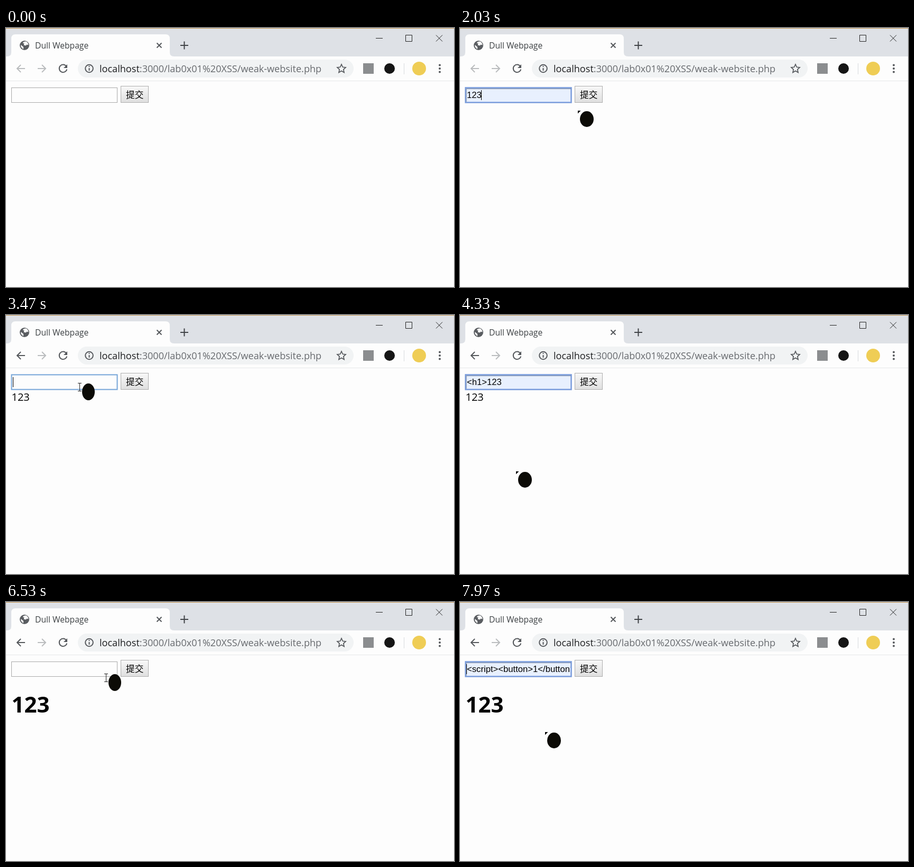
Animation, 848 px wide and 492 px high, one loop 8000 ms. Source, as an HTML page:

```html
<!DOCTYPE html>
<html lang="zh">
<head>
<meta charset="utf-8">
<title>Dull Webpage</title>
<style>
  html, body { margin: 0; width: 100%; height: 100%; overflow: hidden; background: #fdfdfd; }
  svg { display: block; }
  text { font-family: "Open Sans", "Noto Sans", sans-serif; white-space: pre; }
  .line { fill: none; stroke: #55585c; stroke-width: 2; }
  .thin { fill: none; stroke: #222; stroke-width: 1; }
  .field { font: 16.67px "Liberation Sans", Arial, sans-serif; }
  .cjk { font: 16.67px "Noto Sans CJK SC", "Noto Sans CJK", sans-serif; }
</style>
</head>
<body>
<svg width="848" height="492" viewBox="0 0 848 492">
  <defs>
    <linearGradient id="buttonFill" x2="0" y2="1">
      <stop stop-color="#f8f8f8"/><stop offset="1" stop-color="#dfdfdf"/>
    </linearGradient>
    <clipPath id="fieldClip"><rect x="12" y="114" width="197" height="26"/></clipPath>
  </defs>

  <!-- Tab strip -->
  <rect width="848" height="54" fill="#dee1e6"/>
  <rect width="848" height="1" fill="#c79852"/>
  <path d="M2 54q8 0 8-8V20q0-8 8-8H302q8 0 8 8V46q0 8 8 8Z" fill="#fdfdfd"/>
  <circle cx="35" cy="33" r="9" fill="#5a5d61"/>
  <path d="M28 32l5 4v4q-5-2-5-8ZM34 26l4-.5q4 2 4.500 7l-3-1-2 2-4-1 1-3-3-1Z" fill="#fdfdfd"/>
  <text x="55" y="39" font-size="15.670" fill="#3c4043">Dull Webpage</text>
  <path class="line" d="M285.500 28.500l9 9m0-9l-9 9"/>
  <path class="line" style="stroke:#404347" d="M330 33h15m-7.500-7.500v15"/>
  <path class="thin" d="M700 19.500h13M756.500 13.500h12v12h-12ZM814 13.500l12 12m0-12l-12 12"/>

  <!-- Toolbar -->
  <rect y="54" width="848" height="46" fill="#fdfdfd"/>
  <rect y="100" width="848" height="1" fill="#e6e7e9"/>
  <path id="back" class="line" d="M36 77H21m7-7l-7 7 7 7"/>
  <path class="line" style="stroke:#babcbe" d="M60 77h15m-7-7l7 7-7 7"/>
  <path class="line" d="M114 72.500a7.300 7.300 0 1 0 1.200 6"/>
  <path d="M116 69v7h-7Z" fill="#55585c"/>
  <rect x="136" y="60" width="522" height="34" rx="17" fill="#f1f3f4"/>
  <circle class="line" cx="157.500" cy="77" r="7.300"/>
  <path class="line" d="M157.500 76v5m0-9v2"/>
  <text x="177" y="83.500" font-size="18.100" fill="#676a6e"><tspan fill="#1c1d1f">localhost</tspan>:3000/lab0x01%20XSS/weak-website.php</text>
  <path class="line" style="stroke-width:1.700" d="M635 69l2.400 5.300 5.600.6-4.200 3.900 1.200 5.700-5-2.900-5 2.900 1.200-5.700-4.200-3.900 5.600-.6Z"/>
  <rect x="676" y="67" width="20" height="20" fill="#8b8d8f"/>
  <circle cx="726" cy="77" r="10" fill="#151515"/>
  <rect x="753" y="67" width="1" height="21" fill="#d8dade"/>
  <circle cx="782" cy="77" r="13" fill="#efcd55"/>
  <g fill="#55585c"><circle cx="821" cy="70.500" r="2"/><circle cx="821" cy="77" r="2"/><circle cx="821" cy="83.500" r="2"/></g>

  <!-- Page -->
  <rect id="box" x="10.500" y="113.500" width="200" height="28"/>
  <path id="inset" d="M12 140V115.500H210" fill="none" stroke="#74849c" stroke-width="1"/>
  <g clip-path="url(#fieldClip)"><text id="value" class="field" x="13" y="132.500"></text></g>
  <rect id="caret" y="118" width="1" height="19"/>
  <rect x="217.500" y="110.500" width="52" height="31" fill="url(#buttonFill)" stroke="#adadad"/>
  <text class="cjk" x="227" y="133">提交</text>
  <text id="plain" x="10.500" y="163" font-size="20">123</text>
  <text id="heading" x="10.500" y="210" font-size="42" font-weight="700">123</text>

  <g id="cursor">
    <path id="arrow" d="M0 0h5.500L0 5.500Z"/>
    <path id="beam" class="thin" d="M-3-7.500h7M-3 7.500h7M.5-7.500v15"/>
    <ellipse id="pet" cx="17" fill="#0c0b06"/>
  </g>
</svg>
<script>
const LOOP = 8000, BLINK = 1060;
const $ = id => document.getElementById(id);
const show = (id, visible) => $(id).setAttribute("visibility", visible ? "visible" : "hidden");
const setAttrs = (id, attrs) => {
  for (const name in attrs) $(id).setAttribute(name, attrs[name]);
};

// Each visit to the field: focus, value filled in, form sent.
const visits = [
  { focus: 900, fill: 1650, send: 2450, value: "123", caret: 40 },
  { focus: 3400, fill: 4150, send: 5800, value: "<h1>123", caret: 78 },
  { focus: 6900, fill: 7700, send: LOOP, value: "<script><button>1<\/button>", caret: 12 }
];

// Pointer stops: time, x, y
const stops = [
  [100, 300, 510], [800, 120, 130], [950, 120, 130], [1500, 110, 180],
  [1680, 110, 180], [2030, 223, 157], [2250, 230, 129], [2500, 230, 129],
  [3300, 139, 137], [3600, 139, 137], [4130, 106, 297], [4700, 106, 297],
  [5400, 227, 131], [5850, 227, 131], [6530, 189, 144], [6850, 140, 132],
  [7050, 140, 132], [7680, 161, 247], [LOOP, 161, 247]
];

function pointerAt(t) {
  const i = Math.max(1, stops.findIndex(stop => stop[0] > t));
  const [t0, x0, y0] = stops[i - 1], [t1, x1, y1] = stops[i];
  const u = Math.max(0, (t - t0) / (t1 - t0)), eased = u * u * (3 - 2 * u);
  return [x0 + (x1 - x0) * eased, y0 + (y1 - y0) * eased];
}

function drawField(t) {
  const visit = visits.find(v => t >= v.focus && t < v.send);
  const filled = visit && t >= visit.fill;
  $("value").textContent = filled ? visit.value : "";
  setAttrs("box", {
    fill: filled ? "#e8f0fe" : "#fdfdfd",
    stroke: filled ? "#789bdb" : visit ? "#74a4d8" : "#a9a9a9",
    "stroke-width": filled ? 2.5 : visit ? 2 : 1
  });
  show("inset", filled);
  show("caret", visit && (t - visit.focus) % BLINK < BLINK / 2);
  if (visit) setAttrs("caret", { x: filled ? visit.caret : 13 });
}

function drawPointer(t) {
  const [x, y] = pointerAt(t).map(Math.round);
  const overField = x >= 10 && x <= 211 && y >= 112 && y <= 145;
  setAttrs("cursor", { transform: `translate(${x} ${y})` });
  show("arrow", !overField);
  show("beam", overField);
  setAttrs("pet", overField ? { cy: 9, rx: 12, ry: 16 } : { cy: 16, rx: 13, ry: 15 });
}

function draw(now) {
  const t = now % LOOP, [first, second] = visits;
  $("back").style.stroke = t < first.send ? "#babcbe" : "#55585c";
  show("plain", t >= first.send && t < second.send);
  show("heading", t >= second.send);
  drawField(t);
  drawPointer(t);
}

const start = performance.now();
function tick() {
  draw(performance.now() - start);
  requestAnimationFrame(tick);
}
tick();
</script>
</body>
</html>
```
